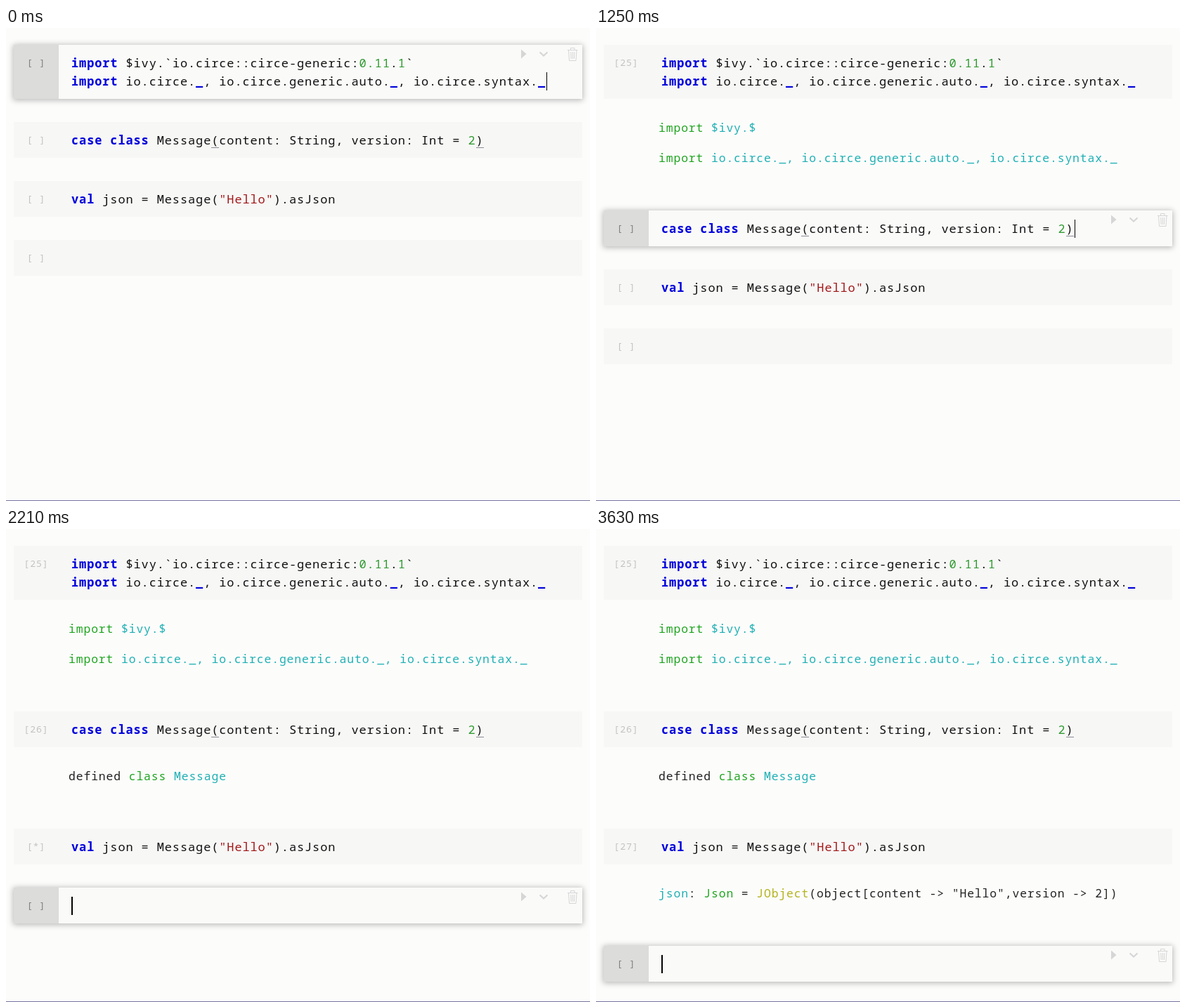
Animation, 831 px wide and 674 px high, one loop 3680 ms. Source, as an HTML page:

```html
<!DOCTYPE html>
<html lang="en">
<head>
<meta charset="utf-8">
<title>Notebook run</title>
<style>
:root { --idle: #f7f7f6; --lit: #fafaf9; --glow: 0 1px 8px 1px rgba(0, 0, 0, .27); }
html, body { margin: 0; width: 100%; height: 100%; overflow: hidden; background: #fcfcfb; }
body {
  position: relative;
  font: 17px/26px "Noto Sans Mono", "DejaVu Sans Mono", monospace;
  letter-spacing: .051em;
  font-variant-ligatures: none;
  color: #111;
}
body::after { content: ""; position: absolute; left: 0; right: 0; top: 673px; height: 1px; background: #7674a0; }
pre, p { margin: 0; font: inherit; white-space: pre; }

/* --on is 1 while a cell has the focus */
.cell {
  --on: 0;
  position: absolute; left: 11px; width: 809px; height: 51px;
  background: var(--idle);
  animation: 3680ms infinite linear, 3680ms infinite step-end, 3680ms infinite step-end;
}
.mark {
  position: absolute; inset: 0 auto 0 0; width: 64px;
  background: rgba(0, 0, 0, calc(.12 * var(--on)));
  color: rgba(0, 0, 0, calc(.21 + .21 * var(--on)));
  font-size: 13.3px; font-weight: 300; text-align: center;
}
.mark div { margin-top: 12px; height: 26px; overflow: hidden; }
.mark p { animation: 3680ms infinite step-end; }
.code { position: absolute; left: 82px; top: 13px; }
.tools { position: absolute; left: 720px; top: 3px; opacity: var(--on); fill: none; stroke: #d6d6d6; }
.caret { position: absolute; width: 1.5px; height: 26px; top: 13px; background: #000; opacity: var(--on); }
.out { position: absolute; left: 89px; font-size: 16.42px; color: #222; animation: 3680ms infinite step-end; }

b { color: #00d; font-weight: 700; }
.n { color: #2f9a2f; }
.s { color: #a11818; }
.g { color: #1fa51f; }
.c { color: #1fb0b4; }
.y { color: #b4b31c; }
u { text-decoration: none; box-shadow: inset 0 -1px #8a8a94; }

#c1 { top: 24px; height: 77px; animation-name: lit1, on1, none; }
#c2 { top: 134px; animation-name: lit2, on2, move2; }
#c3 { top: 218px; animation-name: lit3, on3, move3; }
#c4 { top: 302px; animation-name: lit4, on4, move4; }
#c1 p { animation-name: run1; }
#c2 p { animation-name: run2; }
#c3 p { animation-name: run3; }
#c1 .caret { left: 757.5px; top: 39px; animation: blink1 3680ms infinite step-end; }
#c2 .caret { left: 669.5px; }
#c3 .caret { left: 204.5px; }
#c4 .caret { left: 82px; animation: blink4 3680ms infinite step-end; }
.o1 { animation-name: show1; }
.o2 { animation-name: show2; }
.o3 { animation-name: show3; }

/* focus fades in and out over 120 ms */
@keyframes lit1 {
  0%, 26.63% { background: var(--lit); box-shadow: var(--glow) }
  29.89%, 100% { background: var(--idle); box-shadow: none }
}
@keyframes lit2 {
  0%, 26.63% { background: var(--idle); box-shadow: none }
  29.89%, 40.76% { background: var(--lit); box-shadow: var(--glow) }
  44.02%, 100% { background: var(--idle); box-shadow: none }
}
@keyframes lit3 {
  0%, 40.76% { background: var(--idle); box-shadow: none }
  44.02%, 56.39% { background: var(--lit); box-shadow: var(--glow) }
  59.65%, 100% { background: var(--idle); box-shadow: none }
}
@keyframes lit4 {
  0%, 56.39% { background: var(--idle); box-shadow: none }
  59.65%, 100% { background: var(--lit); box-shadow: var(--glow) }
}

@keyframes on1 { 0% { --on: 1 } 26.63%, 100% { --on: 0 } }
@keyframes on2 { 0% { --on: 0 } 26.63% { --on: 1 } 40.76%, 100% { --on: 0 } }
@keyframes on3 { 0% { --on: 0 } 40.76% { --on: 1 } 56.39%, 100% { --on: 0 } }
@keyframes on4 { 0% { --on: 0 } 56.39%, 100% { --on: 1 } }

@keyframes move2 { 0% { top: 134px } 31.25%, 100% { top: 260px } }
@keyframes move3 { 0% { top: 218px } 31.25% { top: 344px } 45.92%, 100% { top: 427px } }
@keyframes move4 { 0% { top: 302px } 31.25% { top: 428px } 45.92% { top: 511px } 62.23%, 100% { top: 594px } }

/* idle, queued, running, done */
@keyframes run1 { 0% { translate: 0 0 } 26.63% { translate: 0 -26px } 29.35% { translate: 0 -52px } 31.25%, 100% { translate: 0 -78px } }
@keyframes run2 { 0% { translate: 0 0 } 40.76% { translate: 0 -26px } 43.48% { translate: 0 -52px } 45.92%, 100% { translate: 0 -78px } }
@keyframes run3 { 0% { translate: 0 0 } 56.39% { translate: 0 -26px } 59.1% { translate: 0 -52px } 62.23%, 100% { translate: 0 -78px } }

@keyframes show1 { 0% { visibility: hidden } 31.25%, 100% { visibility: visible } }
@keyframes show2 { 0% { visibility: hidden } 45.92%, 100% { visibility: visible } }
@keyframes show3 { 0% { visibility: hidden } 62.23%, 100% { visibility: visible } }

@keyframes blink1 { 0% { visibility: visible } 14.4%, 100% { visibility: hidden } }
@keyframes blink4 { 0% { visibility: visible } 70.79% { visibility: hidden } 85.19%, 100% { visibility: visible } }
</style>
</head>
<body>
<svg width="0" height="0" style="position:absolute">
  <symbol id="tools" viewBox="0 0 84 22">
    <path d="M2 3.5v13l7.5-6.5z" fill="#d6d6d6" stroke="none"/>
    <path d="M28.5 7.5l5.5 5 5.5-5" stroke-width="2.2"/>
    <path d="M68 4.5h14.5M72.5 4V1.5h5.5V4M69.5 5l1 14.5h9.5l1-14.5M72.8 7l.4 10M75.3 7v10M77.800 7l-.4 10"/>
  </symbol>
</svg>

<div class="cell" id="c1">
  <div class="mark"><div><p>[ ]
[…]
[*]
[25]</p></div></div>
  <pre class="code"><b>import</b> $ivy.`io.circe::circe-generic:<span class="n">0.11</span>.<span class="n">1</span>`
<b>import</b> io.circe.<b>_</b>, io.circe.generic.auto.<b>_</b>, io.circe.syntax.<b>_</b></pre>
  <svg class="tools" width="84" height="22"><use href="#tools"/></svg>
  <i class="caret"></i>
</div>

<pre class="out o1" style="top:129px"><span class="g">import</span> <span class="c">$ivy.$</span></pre>
<pre class="out o1" style="top:172px"><span class="g">import</span> <span class="c">io.circe._, io.circe.generic.auto._, io.circe.syntax._</span></pre>

<div class="cell" id="c2">
  <div class="mark"><div><p>[ ]
[…]
[*]
[26]</p></div></div>
  <pre class="code"><b>case class</b> Message<u>(</u>content: String, version: Int = <span class="n">2</span><u>)</u></pre>
  <svg class="tools" width="84" height="22"><use href="#tools"/></svg>
  <i class="caret"></i>
</div>

<pre class="out o2" style="top:339px">defined <span class="g">class</span> <span class="c">Message</span></pre>

<div class="cell" id="c3">
  <div class="mark"><div><p>[ ]
[…]
[*]
[27]</p></div></div>
  <pre class="code"><b>val</b> json = Message(<span class="s">"Hello"</span>).asJson</pre>
  <svg class="tools" width="84" height="22"><use href="#tools"/></svg>
  <i class="caret"></i>
</div>

<pre class="out o3" style="top:506px"><span class="c">json</span>: <span class="g">Json</span> = <span class="y">JObject</span>(object[content -&gt; "Hello",version -&gt; 2])</pre>

<div class="cell" id="c4">
  <div class="mark"><div><p>[ ]</p></div></div>
  <svg class="tools" width="84" height="22"><use href="#tools"/></svg>
  <i class="caret"></i>
</div>
</body>
</html>
```
